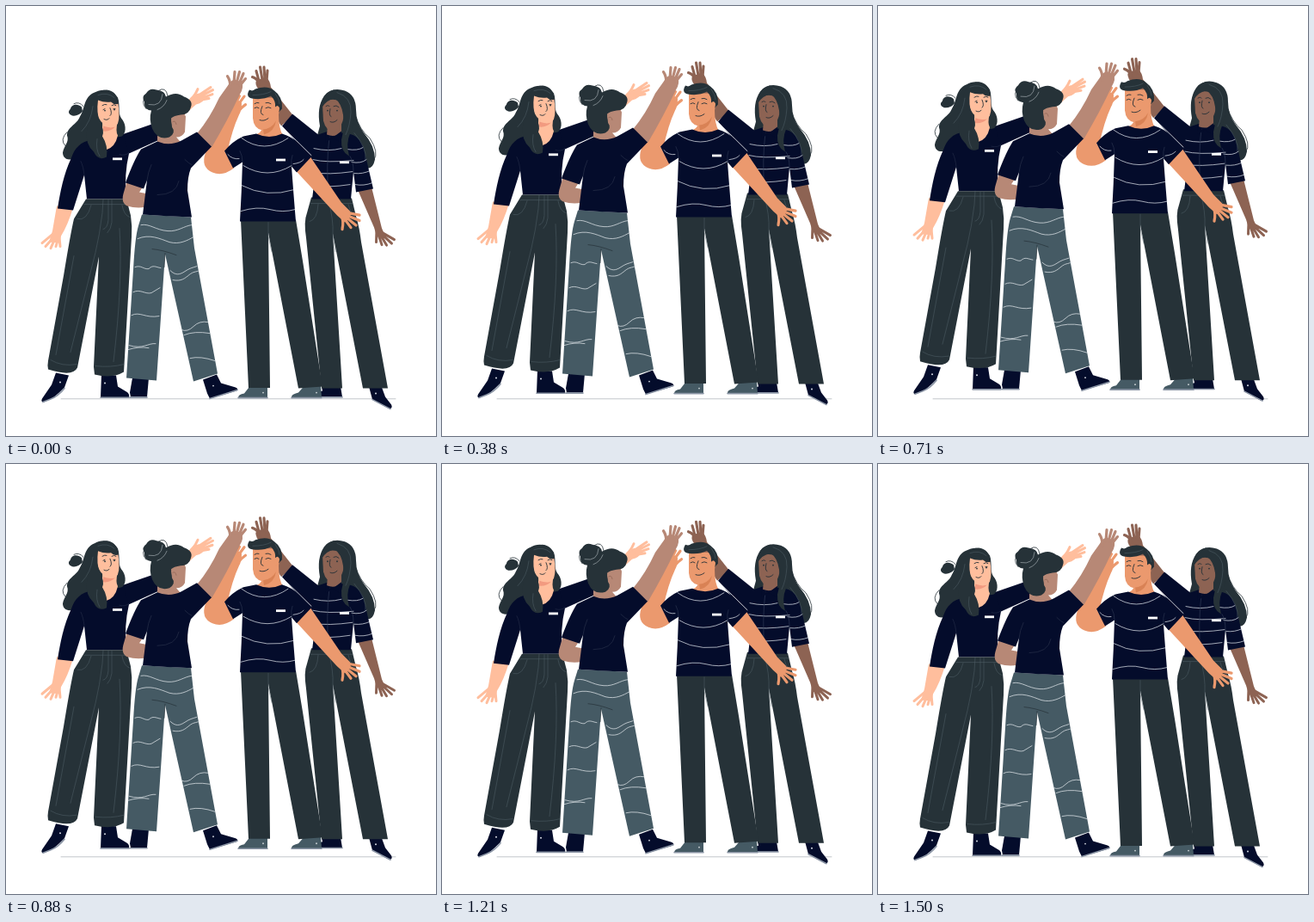
Animation, 500 px wide and 500 px high, one loop 1.54 s. Source, as an HTML page with a canvas:

```html
<!DOCTYPE html>
<html lang="en">
<head>
<meta charset="utf-8">
<style>
  html, body { margin: 0; width: 100%; height: 100%; overflow: hidden; background: #fff; }
  canvas { display: block; width: 100vw; height: 100vh; }
</style>
</head>
<body>
<canvas id="stage"></canvas>
<script>
const SIZE = 500, LOOP = 1540, STEP_MS = 1000 / 24, FLOAT_MS = 1500, RISE = 10, REST_Y = 0.6;
const INK = '#263238', NAVY = '#040c2b', JEANS = '#455a64', SOLE = '#8b95a5', SEAM = '#53626a', WHITE = '#e9edf2';
const PEACH = '#ffbe9d', TAN = '#b78876', ORANGE = '#eb996e', BROWN = '#8d6353';

const canvas = document.getElementById('stage');
const ctx = canvas.getContext('2d');

function fill(color, d) {
  ctx.fillStyle = color;
  ctx.fill(new Path2D(d));
}

function line(color, width, d) {
  ctx.strokeStyle = color;
  ctx.lineWidth = width;
  ctx.stroke(new Path2D(d));
}

function tag(x, y) {
  ctx.fillStyle = '#fff';
  ctx.fillRect(x, y, 11, 2.8);
}

function dot(color, x, y, radius) {
  ctx.fillStyle = color;
  ctx.beginPath();
  ctx.arc(x, y, radius, 0, Math.PI * 2);
  ctx.fill();
}

function shoe(color, body, sole) {
  fill(color, body);
  line(SOLE, 1.6, sole);
}

function curlyHairWoman() {
  // raised arm
  fill(PEACH, 'M185 128 L213 108 Q216 103 224 101 L232 105 Q230 112 221 114 L195 137Z');
  line(PEACH, 3, 'M217 106 Q221 101 223 96 M223 104 L238 94 M225 105 L240.5 97 M226 107 L240 102 M224 109 L236 107');
  fill(NAVY, 'M126 152 L181 133 L194 148 L143 171Z');

  // back hair
  fill(INK, 'M88 117 C83 112 76 114 75 119 Q70 124 77 127 Q84 128 89 122Z');
  fill(INK, 'M103 100 C90 105 92 119 86 128 C82 138 71 140 71 150 C74 158 67 162 66 170 C66 178 75 181 83 174 L106 160 L135 151 C141 146 139 135 134 130 C130 124 133 115 130 106 C124 96 111 95 103 100Z');
  line(INK, .8, 'M71 146 Q62 155 69 162 M79 113 Q85 110 90 116');

  // lowered arm
  fill(PEACH, 'M59 232 L78 234 Q72 254 64 267 L62 275 L50 274 L54 261Z');
  line(PEACH, 3, 'M54 265 L42 275 M54 270 L46 279 M56 272 L52 281 M60 272 L58 279 M62 268 L63 279');

  // shirt and neck
  fill(NAVY, 'M101 155 C86 157 80 165 76 176 C67 195 63 216 60 235 L78 237 L91 196 L94 224 L140 224 Q137 196 143 171 L137 151Z');
  fill(PEACH, 'M112 134 L130 133 Q127 145 130 150 Q127 164 116 167 Q106 163 105 154 Q113 150 112 134Z');
  fill('#f29a80', 'M113 139 Q121 142 127 140 Q121 146 113 145Z');
  fill(PEACH, 'M106 110 Q108 104 118 107 L130 111 Q133 128 130 136 Q126 143 117 139 Q109 135 106 125Z');
  fill(INK, 'M100 111 Q104 97 117 97 Q129 98 131 113 Q126 115 122 111 Q114 112 107 109 Q105 124 109 133 Q115 145 112 151 Q119 162 117 175 Q107 180 102 169 Q92 160 94 145Z');
  line(INK, .9, 'M113 120 l2 -1 M125 119 l2 0 M121 118 Q124 125 121 127 M114 131 Q118 133 120 130 M112 115 q3 -2 5 -1 M123 115 q3 -2 5 0');
  dot(INK, 115, 121, .9);
  dot(INK, 126, 120, .9);
  line(SEAM, .5, 'M107 103 Q118 99 126 106 M101 116 Q99 134 88 145 M106 154 Q104 166 109 174');
  line('#27304b', .6, 'M91 196 Q90 186 87 180 M132 172 Q139 174 143 170');
  tag(124, 175.8);

  // shoes and trousers
  shoe(NAVY, 'M58 426 L73 429 L68 443 Q61 450 55 455 L44 460 Q40 460 42 456 L53 440Z', 'M43 460 L52 456.5 Q61 453 68 444');
  shoe(NAVY, 'M111 428 L128 429 L130 442 L140 448 Q144 450 143 454.5 L110 454.5Z', 'M110 454.7 H143');
  dot('#d7dce5', 63, 437, 1);
  dot('#d7dce5', 115, 438, 1);
  fill(INK, 'M93 224 H140 L145 243 Q147 256 146 268 L137 425 Q124 433 103 428 L102 419 L108 291 L83 420 Q78 431 49 422 Q48 417 49 412 L67 313 Q75 264 79 247Z');
  line(SEAM, .5, 'M91 230 H142 M113 224 L112 240 Q109 265 104 286 L75 402 M119 225 V248 Q118 258 113 259 M123 225 V251 Q122 259 118 263 M83 247 Q94 250 99 231 M135 231 Q137 243 144 245 M52 411 Q65 419 82 416 M104 418 Q122 420 137 416 M132 258 Q136 320 125 413 M79 290 L58 405');
}

function bunWoman() {
  // folded arm
  fill(TAN, 'M141 202 L161 207 L155 216 L170 219 V232 Q153 236 141 232 Q133 228 137 216Z');

  // raised arm
  fill(TAN, 'M222 148 Q237 130 248 106 L258 92 Q261 86 266 85 L274 88 Q277 94 272 102 Q258 132 239 164Z');
  line(TAN, 3.2, 'M261 95 Q261 86 257.5 81 M265 89 L266 76 M268 89 L271.5 76 M271 90 L276 78 M272 92 L278.5 84');

  // boots and trousers
  shoe(NAVY, 'M147 432 H166 L164 454 H145 L144 449Z', 'M144 454.5 H164');
  shoe(NAVY, 'M229 434 L245 428 L250 438 L267 443 Q271 445 268 447 L237 456 L234 450Z', 'M237 456 L269 446');
  dot('#d7dce5', 241, 441, .9);
  fill(JEANS, 'M158 242 L215 245 L219 281 L246 427 L218 436 L185 288 L175 435 L140 432 L148 306 Q150 268 154 255Z');
  line('#dfe5e8', .75, 'M157 254 C167 252 174 260 188 261 C200 262 207 255 216 254 M153 270 C167 264 179 270 190 274 C202 277 211 272 218 268');
  line('#dfe5e8', .75, 'M150 303 C157 300 160 306 166 305 C171 300 174 303 180 304 M148 332 C156 328 162 335 169 333 L179 327 M146 359 C156 354 162 363 178 360 M143 394 C160 399 165 391 174 392 M142 399 Q154 395 166 397');
  line('#dfe5e8', .75, 'M191 307 C197 313 202 312 208 308 S216 304 222 302 M194 318 C204 320 208 316 213 312 S220 309 225 307 M204 376 Q211 379 218 372 T235 367 M207 382 Q219 377 237 380 M214 409 Q226 406 243 412');
  line(INK, .7, 'M170 282 Q182 283 198 289 M185 287 L184 303');

  // neck, head and hair
  fill(TAN, 'M176 145 L195 125 Q207 121 209 128 L208 146 Q205 152 198 152 L204 159 Q190 166 176 158Z');
  fill(INK, 'M169 121 Q160 120 161 111 Q157 105 163 101 Q167 94 175 97 Q185 98 186 105 Q198 98 207 105 Q218 109 215 117 Q213 126 203 126 Q195 127 192 130 L193 140 Q198 147 190 152 Q176 156 170 142 Q166 131 169 121Z');
  fill(TAN, 'M192 132 Q197 127 200 132 Q201 140 194 142Z');
  line('#8d6353', .7, 'M194 134 Q197 132 198 137');
  line('#cfd6da', .5, 'M166 114 Q181 117 182 102 M176 120 Q184 117 187 109');
  line(INK, .8, 'M177 98 Q186 92 188 104 M165 103 Q155 110 163 119');

  // shirt
  fill(NAVY, 'M176 157 Q190 163 204 156 L222 146 L239 163 L215 188 Q211 198 211 214 L216 245 Q187 244 159 242 L164 202 L160 212 L139 205 Q149 178 157 166Z');
  line('#28304a', .7, 'M164 202 Q165 193 169 184 M176 219 Q198 219 201 203 M208 178 Q213 183 216 184');
}

function longHairWoman() {
  // raised forearm
  fill(BROWN, 'M320 139 L294 97 Q288 89 292 85 L303 83 Q307 86 308 94 L334 127Z');
  line(BROWN, 3.1, 'M295 92 Q293 84 286.5 82 M294 86 L291 75 M298 85 L295.5 70.5 M301 85 L300 70.5 M303 87 L304 74.5');

  // back hair
  fill(INK, 'M365 139 Q361 117 370 104 Q379 93 394 98 Q407 103 407 120 Q407 135 416 147 Q429 162 429 178 Q426 193 414 186 L400 160 L362 150Z');
  line(INK, .8, 'M405 124 Q412 145 423 153 Q434 170 428 178');

  // lowered forearm
  fill(BROWN, 'M408 211 L425 210 L437 258 L441 267 L431 267 L428 257Z');
  line(BROWN, 3, 'M434 261 L451.5 271 M435 263 L448.5 275.5 M435 265 L442.5 277.5 M433 265 L437 277 M431 260 L430.5 274');

  // shoes and trousers
  shoe(NAVY, 'M367 442 H389 L391 454 H357 L360 449 L368 447Z', 'M358 454.3 H391');
  shoe(NAVY, 'M422 442 L437 443 L441 454 L448 463 Q450 467 446 468 L426 457Z', 'M426 457 L447 468');
  dot('#d7dce5', 430, 450, 1);
  fill(INK, 'M355 222 L402 223 L407 244 Q411 257 413 274 L444 444 H415 L380 264 L391 444 H367 L349 269 Q346 250 350 240Z');
  line(SEAM, .5, 'M354 229 H403 M375 226 Q381 248 380 265 L383 285 M387 226 Q393 250 390 257 M353 250 Q362 248 363 230 M398 230 Q401 243 407 245');

  // shirt
  fill(NAVY, 'M333 125 L363 149 L375 145 L398 148 Q411 150 416 165 L427 212 L407 216 L404 192 L401 224 H356 Q360 201 355 177 L321 139Z');
  line('#fff', .8, 'M320 139 Q337 155 355 173');
  line(WHITE, .7, 'M358 165 Q375 169 390 165 M357 178 Q372 182 404 179 M358 193 Q374 196 403 192 M359 208 Q374 211 400 207');
  line(WHITE, .7, 'M397 166 Q409 168 415 164 M402 181 Q413 183 419 178 M405 194 Q415 195 423 191 M406 207 Q416 209 426 205');
  line('#37415c', .6, 'M376 152 Q372 184 375 222 M404 192 Q404 180 400 174');

  // head
  fill(BROWN, 'M374 139 L390 132 V146 Q383 153 373 149Z');
  fill(NAVY, 'M371 147 L378 154 L390 145 L389 158 L380 153 L372 158Z');
  fill(BROWN, 'M368 114 Q375 105 389 110 L393 126 Q391 142 381 145 Q372 145 369 133Z');
  fill(INK, 'M367 118 Q367 100 381 97 Q404 98 406 120 Q405 137 400 148 Q395 159 399 174 Q389 169 390 155 Q394 141 392 126 Q390 112 382 107 Q372 109 367 118Z');
  line(INK, .9, 'M372 116 q3 -2 4 0 M381 116 q3 -2 6 1 M377 119 Q375 127 378 128 M377 134 Q381 136 385 132');
  dot(INK, 374, 121, .9);
  dot(INK, 385, 121, .9);
  line(SEAM, .5, 'M385 100 Q402 105 401 123 Q400 139 395 149 M405 147 Q420 165 418 178');
  tag(388, 179.8);
}

function man() {
  // raised arm
  fill(ORANGE, 'M254 168 L265 188 Q252 198 240 193 Q226 187 232 170 Q243 141 260 120 Q265 111 268 108 L274 112 Q274 121 271 126 Q263 143 257 171Z');
  line(ORANGE, 3.2, 'M267 113 L271.5 104 M270 114 L277 104.5 M270 122 Q274 117 278.5 114');

  // shoes and trousers
  shoe(JEANS, 'M284 441 H304 V455 H270 Q270 451 277 450Z', 'M270 455 H304');
  shoe(JEANS, 'M347 441 H366 L367 455 H332 Q331 451 340 449Z', 'M332 455 H367');
  dot('#cfd6da', 299, 449, .9);
  dot('#cfd6da', 361, 449, .9);
  fill(INK, 'M273 248 H337 L345 296 L368 442 L340 444 L305 263 L307 443.5 H282Z');
  line(SEAM, .5, 'M305 251 L305 267 L309 285');

  // lowered arm
  fill(ORANGE, 'M336 190 L354 175 L390 228 L400 238 Q403 245 394 251 L385 243Z');
  line(ORANGE, 3.2, 'M393 239 L411 242.5 M394 242 L411 249 M394 244 L407 254.5 M393 246 L401 257 M390 242 Q393 250 391 259');

  // shirt
  fill(ORANGE, 'M298 134 L317 125 Q317 142 322 150 Q306 159 291 149 Q300 146 298 134Z');
  fill(NAVY, 'M276 151 L291 148 Q306 155 321 148 Q332 151 341 160 L355 175 L338 193 L332 186 Q334 214 337 250 H272 Q274 216 275 181 L264 188 L254 168 Q263 157 276 151Z');
  line(WHITE, .7, 'M274 153 Q300 172 328 153 M258 172 Q263 178 271 177 M276 185 Q304 202 332 185 M334 183 Q343 182 346 178');
  line(WHITE, .7, 'M274 208 Q303 223 335 213 M273 238 Q292 232 307 236 T336 236');
  line('#303a54', .6, 'M275 181 Q275 173 272 168 M332 186 Q331 178 333 173');
  tag(314, 177);

  // head
  fill(ORANGE, 'M287 106 L314 106 Q320 115 317 126 Q312 143 298 144 Q288 142 287 130Z');
  fill('#d98255', 'M299 143 Q309 142 314 133 Q312 146 300 149Z');
  fill(INK, 'M283 97 Q287 99 290 96 Q304 91 312 98 Q322 105 321 119 L317 123 L313 117 Q314 110 308 104 Q299 109 286 107 Q278 105 283 97Z');
  fill(ORANGE, 'M312 118 Q316 113 318 118 Q318 125 313 126Z');
  line(INK, .9, 'M289 118 q3 -2 5 0 M302 118 q3 -2 6 0 M289 113 q3 -2 5 -1 M302 112 q3 -1 6 1 M298 116 Q294 125 299 126 M295 132 Q300 134 305 130');
  line(SEAM, .5, 'M287 103 Q300 103 308 99 M313 101 Q318 108 318 113');
}

// Steps start up to a few milliseconds early, hence the small lead.
function rise(time) {
  const step = Math.floor((time % LOOP) / STEP_MS + 0.15);
  const phase = Math.min(1, step * STEP_MS / FLOAT_MS);
  return RISE * (1 - Math.abs(2 * phase - 1));
}

function draw(time) {
  const ratio = window.devicePixelRatio || 1;
  const width = Math.round(innerWidth * ratio), height = Math.round(innerHeight * ratio);
  if (canvas.width !== width || canvas.height !== height) {
    canvas.width = width;
    canvas.height = height;
  }
  ctx.setTransform(width / SIZE, 0, 0, height / SIZE, 0, 0);
  ctx.fillStyle = '#fff';
  ctx.fillRect(0, 0, SIZE, SIZE);
  ctx.lineCap = ctx.lineJoin = 'round';
  line('#a9afb5', .7, 'M64 456.8 H453');
  ctx.translate(0, REST_Y - rise(time));
  curlyHairWoman();
  longHairWoman();
  man();
  bunWoman();
}

const start = performance.now();
function tick() {
  draw(performance.now() - start);
  requestAnimationFrame(tick);
}
tick();
</script>
</body>
</html>
```
